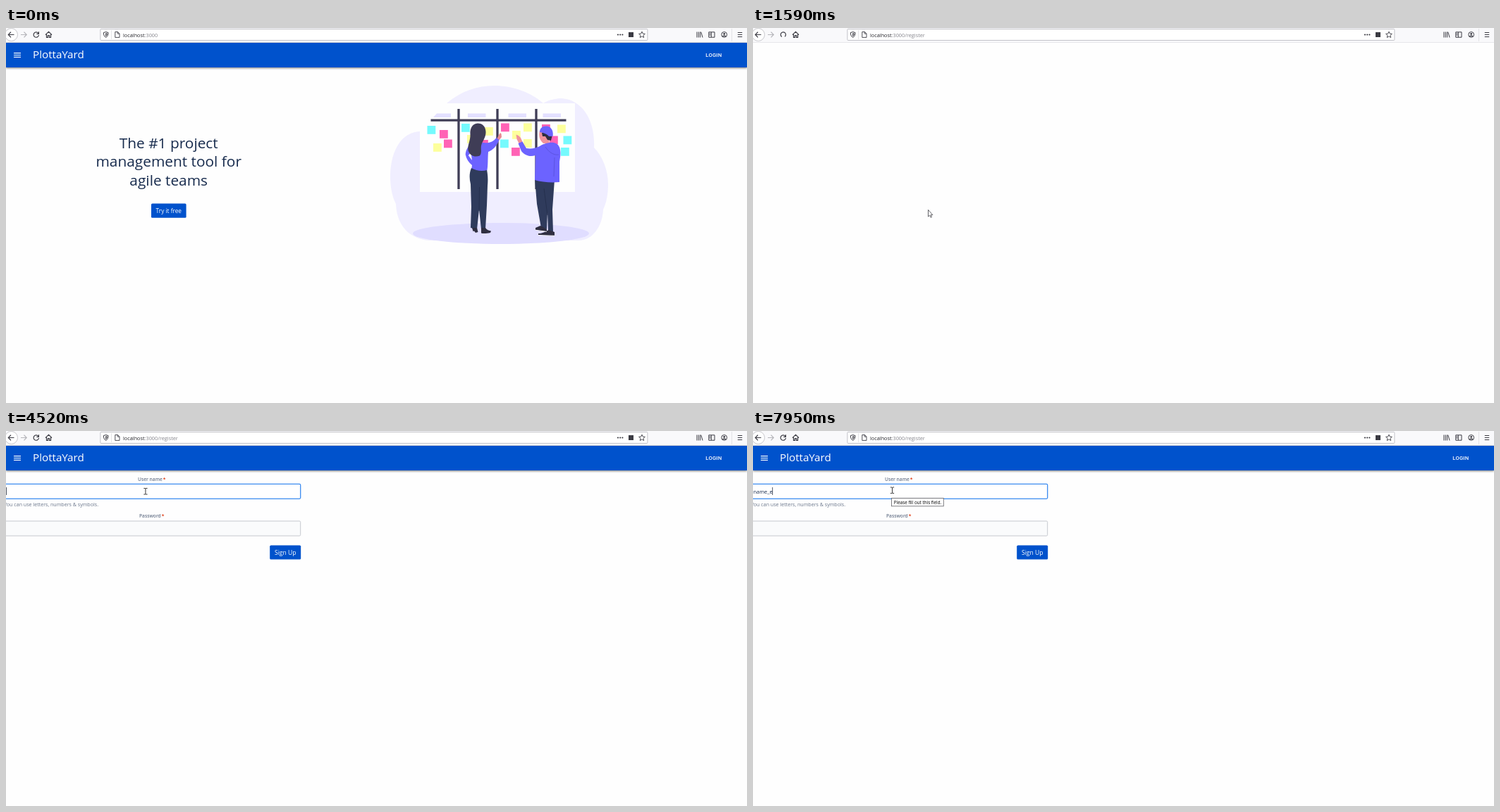
Recreate the animation shown at these times as an HTML page. Size 1051 by 533 pixels, loop 8 s.

```html
<!DOCTYPE html>
<html lang="en">
<head>
<meta charset="utf-8">
<title>Project board sign-up</title>
<style>
  html, body { margin: 0; width: 100%; height: 100%; overflow: hidden; background: #fefefe; }
  svg { display: block; width: 1051px; height: 533px; font-family: "Open Sans", "Noto Sans", sans-serif; }
  .icon { fill: none; stroke: #3b3b43; stroke-width: 1.2; }
  .label { font-size: 6.65px; font-weight: 600; fill: #6b778c; }
  .field { fill: #fafbfc; stroke: #c5c8ce; }
  .field.hover { fill: #ebecf0; }
  .field.focus { fill: #fff; stroke: #3c8cf0; stroke-width: 1.3; }
  .hidden { display: none; }
</style>
</head>
<body>
<svg viewBox="0 0 1051 533">
  <!-- browser toolbar -->
  <rect width="1051" height="20.5" fill="#f9f9fb"/>
  <path d="M0 20.5H1051" stroke="#e3e3e6" stroke-width=".8"/>
  <rect x="133.9" y="1.5" width="776" height="16" rx="1" fill="#fff" stroke="#bcbcc2" stroke-width=".9"/>
  <path d="M149.5 3V16M1029.5 1V19" stroke="#dcdce0" stroke-width=".8"/>
  <g class="icon">
    <circle cx="7.5" cy="9.5" r="9" fill="#fff" stroke="#bbbbc0" stroke-width=".8"/>
    <path d="M11.5 9.5H3.5M7 5.7L3.3 9.5L7 13.3"/>
    <path d="M21 9.5H29M25.5 5.7L29.2 9.5L25.5 13.3" stroke="#b5b5ba"/>
    <path d="M56 9.6L60.5 5.4L65 9.6M57.5 9V13.4H59.5V10.5H61.5V13.4H63.5V9"/>
    <path d="M141.7 5.5L145 6.6C145 10 144 12 141.7 13.4C139.4 12 138.4 10 138.4 6.6ZM141.7 7.4V11.4C142.8 10.5 143.2 9.5 143.3 8Z" stroke-width="1"/>
    <path d="M154.8 5.5H158.6L161 7.9V13.4H154.8ZM158.4 5.7V8.2H160.8" stroke-width=".9"/>
    <path d="M902 5.1L903.3 8L906.4 8.3L904 10.4L904.7 13.5L902 11.9L899.3 13.5L900 10.4L897.6 8.3L900.7 8Z" stroke-width=".9"/>
    <path d="M980 5.5V13.5M982.3 5.5V13.5M984.6 5.5V13.5M985.8 5.6L988 13.5" stroke-width="1"/>
    <path d="M996.8 5.8H1005V13.2H996.8ZM1000.3 6V13M997.5 8H999.5M997.5 10H999.5" stroke-width="1"/>
    <circle cx="1018.7" cy="9.4" r="3.9" stroke-width="1"/>
    <path d="M1037.8 6.5H1044.2M1037.8 9.5H1044.2M1037.8 12.5H1044.2" stroke-width="1.1"/>
  </g>
  <g fill="#3b3b43">
    <circle cx="868" cy="9.5" r="1.1"/><circle cx="871.2" cy="9.5" r="1.1"/><circle cx="874.4" cy="9.5" r="1.1"/>
    <rect x="883" y="6" width="7" height="7"/>
    <circle cx="1018.7" cy="8.4" r="1.4"/><path d="M1016 12a2.8 2 0 0 1 5.4 0Z"/>
  </g>
  <path id="reload" class="icon"/>
  <text x="166" y="12.5" font-size="7.3" fill="#25252b">localhost<tspan id="path" fill="#85858c"></tspan></text>

  <!-- app bar -->
  <g id="bar">
    <rect y="21" width="1051" height="35" fill="#0052cc" style="filter:drop-shadow(0 1.2px 1.8px #0008)"/>
    <path d="M11 35.6H21M11 38.5H21M11 41.4H21" stroke="#fff" stroke-width="1.1"/>
    <text x="38" y="43" font-size="15.2" fill="#fff">PlottaYard</text>
    <text x="992.3" y="41.3" font-size="7.66" letter-spacing=".22" fill="#fff" style="font-family:Roboto,sans-serif;font-weight:500">LOGIN</text>
  </g>

  <g id="home">
    <g font-size="20.85" fill="#172b4d" text-anchor="middle">
      <text x="230.7" y="170.8">The #1 project</text>
      <text x="230.7" y="197.3">management tool for</text>
      <text x="230.7" y="223.7">agile teams</text>
    </g>
    <rect id="try" x="206" y="249.4" width="49.6" height="20.4" rx="1.6"/>
    <text x="230.8" y="263" font-size="8.3" fill="#fff" text-anchor="middle">Try it free</text>

    <path fill="#f0eeff" d="M587 107H625C645 90 668 82 692 82C720 82 745 92 762 107C770 102 780 100 788 100C818 102 836 132 834 170C846 182 854 202 854 222C854 238 851 250 847 258C846 282 832 302 812 302H600C572 300 554 280 553 250C547 238 545 224 545 210C546 172 562 148 587 147Z"/>
    <ellipse cx="702" cy="292" rx="125" ry="15" fill="#e0ddff"/>
    <path fill="#f0eeff" d="M570 302H834V306H570Z" opacity="0"/>
    <rect x="587" y="107" width="220" height="126" fill="#fefefe"/>
    <path fill="#e3e0ff" d="M611 121.5H631V127H606ZM655 121.5h25.5v5.5h-25.5ZM712.5 121.5h25.5v5.5h-25.5ZM761.5 121.5h25.5v5.5h-25.5Z"/>
    <path stroke="#3f3d56" stroke-width="3.3" d="M602.5 131.2H794.5M642 115V229M697 115V229M752 115V229"/>
    <g id="notes"></g>

    <!-- woman -->
    <path fill="#e98a93" d="M696 158L699 152L701 149L702.5 150.5L703 155L699 160Z"/>
    <path fill="#6c63ff" d="M661 163C655 168 652 174 651.7 180C653 186 656 191 661 195L660 203L682 204C684 196 683 187 684 176C690 174 696 168 699.5 159L695.5 156C691 162 685 164 678 163Z"/>
    <path fill="#fefefe" d="M659.5 177L655.8 181L661 188Z"/>
    <path fill="#2f3b5c" d="M660 199C657 206 657 214 659 222L660 254L659 284L668 286L671 258L674 286H680L682 252L683 224C684 214 683 206 682 202C675 204 667 203 660 199Z"/>
    <path fill="none" stroke="#25304e" d="M671.5 226L671 260"/>
    <path fill="#2f2e41" d="M661 284H668L669.5 290L666 291L664 288.5L662.5 289ZM674 284H680C682 287 685 288 688 288.5L687 291C682 292 677 292.5 674 291.5Z"/>
    <path fill="#3f3d56" d="M669 135.5C661 136 658 143 658.5 151C659 160 654 167 655.5 174C658 182 665 184 672 181.5C676 177 672 171 675 164C678 158 681 153 680.5 147C680 140 676 135.5 669 135.5Z"/>

    <!-- man -->
    <path fill="#f0929c" d="M723.5 151.5L727 153L730 156L733 163L728.5 166L724.5 158ZM757 146L768 148L771 164H762C757 159 755 154 757 146Z"/>
    <path fill="#2f3b5c" d="M750 214L753 250L759 284L767 286L768 262L769 290H776L775 258L778 216Z"/>
    <path fill="none" stroke="#25304e" d="M763 228L768 266"/>
    <path fill="#6c63ff" d="M757 168C763 164 774 161 780 164C788 168 787 180 785 190L785 219C773 220 760 219 750 216L751 181C742 184 735 180 731 175L726.5 164L732.5 161.5L738 171C745 172 751 171 757 168Z"/>
    <path fill="none" stroke="#5b53dd" stroke-width=".9" d="M765 169C771 178 778 181 784 180M778 184L777 211"/>
    <path fill="#2f2e41" d="M760 149C765 148 770 150 775 152L773 160L768 159L765 154L761 154Z"/>
    <path fill="#6c63ff" d="M757 148C757 142 762 139 767 139.5C773 140 777 146 775.5 154L770 154C767 150 762 149 757 148Z"/>
    <path fill="#2f2e41" d="M751 284L758 281L767 286V289C761 289 756 288 751 287ZM755 292C762 292 767 288 770 287L778 290V295C770 295.5 762 295 755 294Z"/>
    <path fill="none" stroke="#fefefe" stroke-width=".9" d="M751 287.2L767 289.4M755 294.5L778 295.3"/>
  </g>

  <g id="form">
    <text class="label" x="187" y="70.8">User name<tspan fill="#de350b" dx="1">*</tspan></text>
    <rect id="user" class="field" x="-5" y="75.4" width="422.7" height="20.9" rx="1.5"/>
    <text x="-2.8" y="107" font-size="7.1" fill="#6b778c">You can use letters, numbers &amp; symbols.</text>
    <text class="label" x="189" y="122.9">Password<tspan fill="#de350b" dx="1">*</tspan></text>
    <rect id="pass" class="field" x="-5" y="128" width="422.7" height="21" rx="1.5"/>
    <rect x="374.2" y="162.6" width="44" height="20" rx="1.6" fill="#0052cc"/>
    <text x="396.3" y="176" font-size="8.6" fill="#fff" text-anchor="middle">Sign Up</text>
    <text id="typed" x=".5" y="88.5" font-size="7.4" fill="#172b4d"></text>
    <path id="caret" d="M.5 80V91" stroke="#222b3c" stroke-width=".8"/>
    <g id="tip">
      <rect x="196.5" y="95.5" width="73.8" height="11.3" fill="#fff" stroke="#6f6f73" stroke-width=".9"/>
      <text x="199.8" y="103.7" font-size="6.3" fill="#000">Please fill out this field.</text>
    </g>
  </g>

  <g id="cursor">
    <circle id="press" r="7" fill="#f7e93c" opacity=".75"/>
    <path id="arrow" d="M0 0V9.6L2.1 7.7L3.6 10.8L5 10.2L3.6 7.2H6.4Z" fill="#fff" stroke="#25252b" stroke-width=".7"/>
    <path id="beam" d="M-2.6 -4.3H-.7L0 -3.8L.7 -4.3H2.6M0 -4V4M-2.6 4.3H-.7L0 3.8L.7 4.3H2.6" fill="none" stroke="#222" stroke-width=".9"/>
  </g>
</svg>
<script>
const $ = id => document.getElementById(id);
const show = (id, on) => $(id).classList.toggle('hidden', !on);
const passed = (times, t) => times.filter(at => at <= t).length;

const notes = {
  '#75fafd': [[597.5, 139], [646, 136], [701, 158.5], [790.5, 153.5], [787, 170]],
  '#ff63b5': [[615, 145], [621, 158.5], [672, 159], [702, 135.5], [717, 170], [760, 137], [771, 153.5]],
  '#fdff9c': [[606, 164], [679, 141], [654, 152], [734, 135.5], [718, 146], [734, 158], [782, 137.5]]
};
$('notes').innerHTML = Object.entries(notes).map(([fill, spots]) =>
  spots.map(([x, y]) => `<rect x="${x}" y="${y}" width="11.8" height="11.8" fill="${fill}"/>`).join('')).join('');

// Pointer keys: time, x, y
const track = [
  [230, 888, 521], [420, 760, 468], [640, 470, 345], [860, 278, 272], [1010, 249, 260], [1120, 248.5, 258.5],
  [2200, 248.5, 258.5], [2540, 236, 205], [2890, 213, 126], [3130, 206, 95], [3300, 204.3, 86.7],
  [4450, 204.3, 86.7], [4610, 193, 85], [4760, 192.3, 84.5], [4920, 197.5, 84.3]
];
const caretFlips = [3590, 4050, 4520, 5150, 5680, 6160, 6710, 7320, 7630, 7780, 7950];
const keyTimes = [6790, 7020, 7095, 7170, 7630, 7950];
const icons = {
  reload: 'M45.7 7.2A3.7 3.7 0 1 0 46.5 10M46.4 5.3V8.3H43.4',
  spin: 'M40.8 12.4A3.6 3.6 0 1 1 45.2 12.2',
  stop: 'M39.3 6L46.2 13M46.2 6L39.3 13'
};

function pointer(t) {
  const step = 230 + Math.floor((t - 230) / 78) * 78 + 20;
  const i = passed(track.map(k => k[0]), step);
  const a = track[Math.max(i - 1, 0)], b = track[i] || a;
  const f = b === a ? 0 : (step - a[0]) / (b[0] - a[0]);
  return [1, 2].map(n => a[n] + (b[n] - a[n]) * f);
}

function draw(t) {
  const home = t < 1590, form = t >= 2120, focus = t >= 3590;
  const [x, y] = pointer(t);
  const onUser = form && y > 75 && y < 96.5, onPass = form && y > 128 && y < 149;

  show('home', home);
  show('form', form);
  show('bar', home || form);
  $('path').textContent = home ? ':3000' : ':3000/register';
  $('reload').setAttribute('d', home || t >= 2280 ? icons.reload : t < 1670 ? icons.spin : icons.stop);
  $('try').setAttribute('fill', t >= 1010 ? '#0747a6' : '#0052cc');

  $('user').classList.toggle('hover', onUser);
  $('user').classList.toggle('focus', focus);
  $('pass').classList.toggle('hover', onPass);
  $('typed').textContent = 'name_e'.slice(0, passed(keyTimes, t));
  const width = $('typed').textContent ? $('typed').getComputedTextLength() : 0;
  $('caret').setAttribute('transform', `translate(${width})`);
  show('caret', passed(caretFlips, t) % 2);
  show('tip', t >= 5460);

  show('cursor', t >= 230);
  show('arrow', !onUser && !onPass);
  show('beam', onUser || onPass);
  show('press', (t >= 1430 && t < 1500) || (t >= 3440 && t < 3670));
  $('cursor').setAttribute('transform', `translate(${x} ${y})`);
}

const start = performance.now();
function tick() {
  draw((performance.now() - start) % 8000);
  requestAnimationFrame(tick);
}
tick();
</script>
</body>
</html>
```
